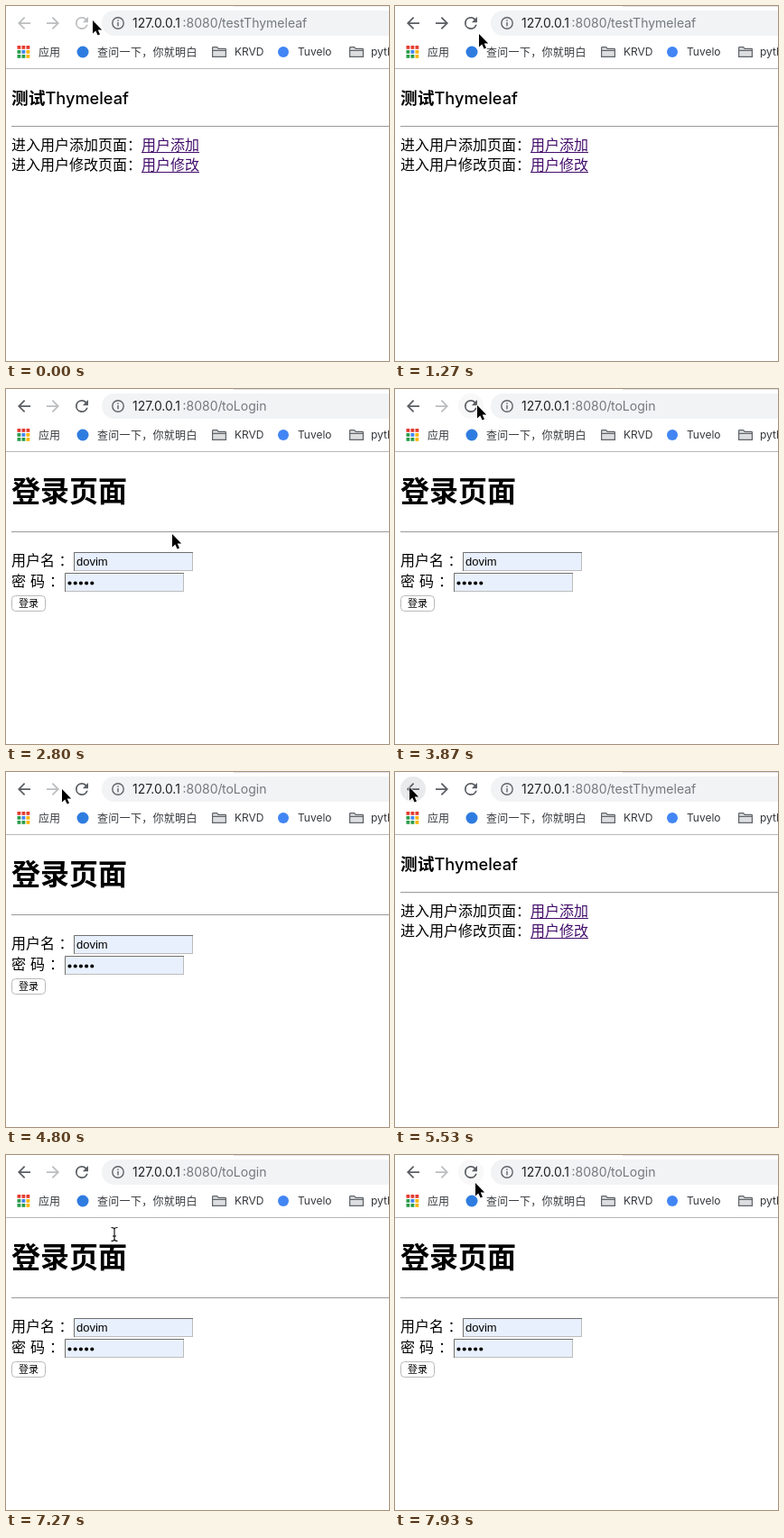
Recreate the animation shown at these times as an HTML page. Size 424 by 394 pixels, loop 8000 ms.

```html
<!DOCTYPE html>
<html lang="zh-CN">
<head>
<meta charset="utf-8">
<title>Thymeleaf</title>
<style>
html, body { margin: 0; width: 100%; height: 100%; overflow: hidden; background: #fff; }
svg { display: block; width: 424px; height: 394px; }
text { font: 16px "Noto Sans CJK SC", "Noto Sans CJK", sans-serif; fill: #000; }
.ui { font: 12px Inter, "Noto Sans CJK SC", "Noto Sans CJK", sans-serif; fill: #35383c; }
.zh { letter-spacing: .3px; }
.url { font: 14px Inter, sans-serif; fill: #74797e; }
.host { fill: #202124; letter-spacing: -.05px; }
.h1 { font-size: 32px; font-weight: 700; }
.h3 { font-size: 18.72px; font-weight: 700; }
.h3 tspan { font: 500 18.2px Inter, sans-serif; }
.link { fill: #430d6b; }
.input { font: 13px "Liberation Sans", Arial, sans-serif; }
.btn { font-size: 11px; }
</style>
</head>
<body>
<svg viewBox="0 0 424 394">
  <defs>
    <path id="arrowIcon" d="M20 11H7.83l5.59-5.59L12 4l-8 8 8 8 1.41-1.41L7.83 13H20z"/>
    <g id="folder" stroke="#5f6368" stroke-width="1.2">
      <path d="M.6 11.4V1.4Q.6.6 1.4.6H5.6L7.2 2.4H14.6Q15.4 2.4 15.4 3.2V11.4Z" fill="#dcdee0"/>
      <path d="M.6 4.4H15.4" fill="none"/>
    </g>
  </defs>
  <rect width="424" height="394" fill="#fff"/>

  <rect id="strip" x="252" width="172" height="1"/>
  <circle id="hover" cy="19" r="14"/>
  <use id="back" href="#arrowIcon" transform="translate(9.5 8.5) scale(.875)"/>
  <use id="next" href="#arrowIcon" transform="translate(62.5 8.5) scale(-.875 .875)"/>
  <path id="reload" transform="translate(73.5 8.5) scale(.875)" d="M17.65 6.35A7.95 7.95 0 0 0 12 4a8 8 0 1 0 7.73 10h-2.08A6 6 0 1 1 12 6c1.66 0 3.14.69 4.22 1.78L13 11h7V4z"/>
  <rect x="106" y="5" width="350" height="28" rx="14" fill="#f1f3f4"/>
  <g fill="#5f6368">
    <circle cx="124" cy="19" r="6.2" fill="none" stroke="#5f6368" stroke-width="1.4"/>
    <rect x="123.3" y="18" width="1.4" height="4.4"/>
    <rect x="123.3" y="15.4" width="1.4" height="1.5"/>
  </g>
  <text class="url host" x="140" y="24">127.0.0.1</text>
  <text class="url" x="195.5" y="24">:8080/</text>
  <text class="url" id="route" x="239" y="24"></text>

  <g id="apps"></g>
  <text class="ui" x="36" y="55.5">应用</text>
  <circle cx="85" cy="51" r="6.5" fill="#2f7ce0"/>
  <text class="ui zh" x="101" y="55.5">查问一下，你就明白</text>
  <use href="#folder" x="228" y="45"/>
  <text class="ui" x="253" y="55">KRVD</text>
  <circle cx="307" cy="51" r="6" fill="#4285f4"/>
  <text class="ui" x="323" y="55">Tuvelo</text>
  <use href="#folder" x="380" y="45"/>
  <text class="ui" x="404" y="55">python</text>
  <rect y="69" width="424" height="1" fill="#b8b8b8"/>

  <g id="home">
    <text class="h3" x="6" y="109">测试<tspan>Thymeleaf</tspan></text>
    <rect x="6" y="133" width="418" height="1" fill="#9a9a9a"/>
    <text x="6" y="160">进入用户添加页面：</text>
    <text class="link" x="150" y="160">用户添加</text>
    <text x="6" y="182">进入用户修改页面：</text>
    <text class="link" x="150" y="182">用户修改</text>
    <path d="M150 162.5h64M150 184.5h64" stroke="#430d6b"/>
  </g>

  <g id="login">
    <text class="h1" x="6" y="125">登录页面</text>
    <rect x="6" y="158" width="418" height="1" fill="#9a9a9a"/>
    <text x="6" y="196">用户名</text>
    <text x="58.5" y="196">：</text>
    <text x="6" y="219">密</text>
    <text x="27" y="219">码</text>
    <text x="48" y="219">：</text>
    <g id="fields" stroke="#bcbcbc">
      <rect x="75.5" y="181.5" width="131" height="20"/>
      <rect x="65.5" y="204.5" width="131" height="20"/>
      <path d="M75.5 202V181.5H207M65.5 225V204.5H197" fill="none" stroke="#707070"/>
    </g>
    <g id="filled">
      <text class="input" x="78" y="196">dovim</text>
      <path d="M70.5 215.5h25.5" stroke="#000" stroke-width="4.2" stroke-linecap="round" stroke-dasharray="0 6.2"/>
    </g>
    <rect x="6.5" y="229.5" width="37" height="17" rx="4" fill="#fff" stroke="#b9b9b9"/>
    <text class="btn" x="14" y="242">登录</text>
  </g>

  <g id="cursor" stroke-linejoin="round">
    <path id="arrow" d="M0 0V14.5L3.3 11.4 5.6 16.6 8 15.6 5.7 10.5H10.2Z" stroke="#fff" stroke-width="1.2" paint-order="stroke"/>
    <g id="hand" stroke="#000" stroke-width="1.1" transform="translate(0 -.7)">
      <path fill="#fff" d="M-1.6 10.2V1.6a1.6 1.6 0 0 1 3.2 0V6.4a1.5 1.5 0 0 1 3 .2 1.5 1.5 0 0 1 2.9.5 1.4 1.4 0 0 1 2.7.5V11.5Q10 14 9 16.5H.5Q-1 14.5-4.2 11.2a1.5 1.5 0 0 1 2.6-1Z"/>
      <path d="M1.8 10.5v3.5M4.3 10.5v3.5M6.8 10.5v3.5" fill="none" stroke-width=".9"/>
    </g>
    <path id="beam" d="M-3.5-7.5Q0-7.5 0-5.5Q0-7.5 3.5-7.5M0-5.5V5.5M-3.5 7.5Q0 7.5 0 5.5Q0 7.5 3.5 7.5M-2 2H2" fill="none" stroke="#000" stroke-width="1.1"/>
  </g>
</svg>
<script>
const $ = id => document.getElementById(id);
const LOOP = 8000, TICK = 1000 / 15;

// Pointer stops: tick, x, y
const stops = [
  [0, 96, 16], [3, 97, 32], [13, 97, 32], [16, 88, 24], [18, 88, 24], [20, 97, 37],
  [27, 97, 37], [32, 184, 160], [36, 184, 161], [48, 184, 161], [55, 92, 22], [58, 91, 18],
  [69, 91, 18], [76, 18, 20], [82, 16, 17], [83, 16, 17], [91, 166, 178], [95, 172, 184],
  [104, 168, 180], [106, 168, 180], [109, 120, 88], [114, 92, 36], [119, 89, 31], [120, 89, 31]
];

const red = '#e53b2e', green = '#2a9d4a', blue = '#4285f4', yellow = '#fbb505';
$('apps').innerHTML = [red, red, red, green, blue, yellow, green, green, yellow]
  .map((c, i) => `<rect x="${12.5 + i % 3 * 5}" y="${44 + Math.floor(i / 3) * 5}" width="3.8" height="3.8" fill="${c}"/>`)
  .join('');

const show = (id, on) => $(id).setAttribute('display', on ? 'inline' : 'none');
const fill = (id, color) => $(id).setAttribute('fill', color);
const within = (n, a, b) => n >= a && n < b;

function pointer(n) {
  const i = stops.findIndex(s => s[0] > n);
  const [n0, x0, y0] = stops[i - 1], [n1, x1, y1] = stops[i];
  const p = (n - n0) / (n1 - n0), e = p * p * (3 - 2 * p);
  return [x0 + (x1 - x0) * e, y0 + (y1 - y0) * e];
}

function pointerKind(x, y, login) {
  if (y < 70) return 'arrow';
  if (login) {
    const text = within(y, 84, 136) || (within(y, 179, 226) && x < 207);
    return text ? 'beam' : 'arrow';
  }
  if (within(x, 150, 214) && within(y, 144, 187)) return 'hand';
  return within(y, 92, 116) || (within(y, 144, 187) && x < 150) ? 'beam' : 'arrow';
}

function draw(ms) {
  const n = Math.min(119, Math.floor((ms % LOOP + 4) / TICK));
  const active = n >= 9;
  const login = within(n, 41, 80) || n >= 100;
  const filled = n !== 41 && !within(n, 61, 64) && n !== 100;
  const [x, y] = pointer(n);

  const dark = '#5a5e63', pale = '#bbbdbf';
  fill('strip', active ? '#dee1e6' : '#eaecee');
  fill('back', active ? dark : pale);
  fill('next', active && !login ? dark : pale);
  fill('reload', active ? dark : pale);

  const overBack = Math.hypot(x - 20, y - 19) < 14;
  const overReload = Math.hypot(x - 84, y - 19) < 14;
  show('hover', active && (overBack || overReload));
  $('hover').setAttribute('cx', overBack ? 20 : 84);
  fill('hover', overBack ? '#e8eaeb' : '#f8f8f9');

  $('route').textContent = login ? 'toLogin' : 'testThymeleaf';
  show('home', !login);
  show('login', login);
  show('filled', filled);
  fill('fields', filled ? '#e8f0fe' : '#fff');

  const kind = pointerKind(x, y, login);
  for (const id of ['arrow', 'hand', 'beam']) show(id, id === kind);
  $('cursor').setAttribute('transform', `translate(${Math.round(x)} ${Math.round(y)})`);
}

const start = performance.now();
function frame() {
  draw(performance.now() - start);
  requestAnimationFrame(frame);
}
frame();
</script>
</body>
</html>
```
